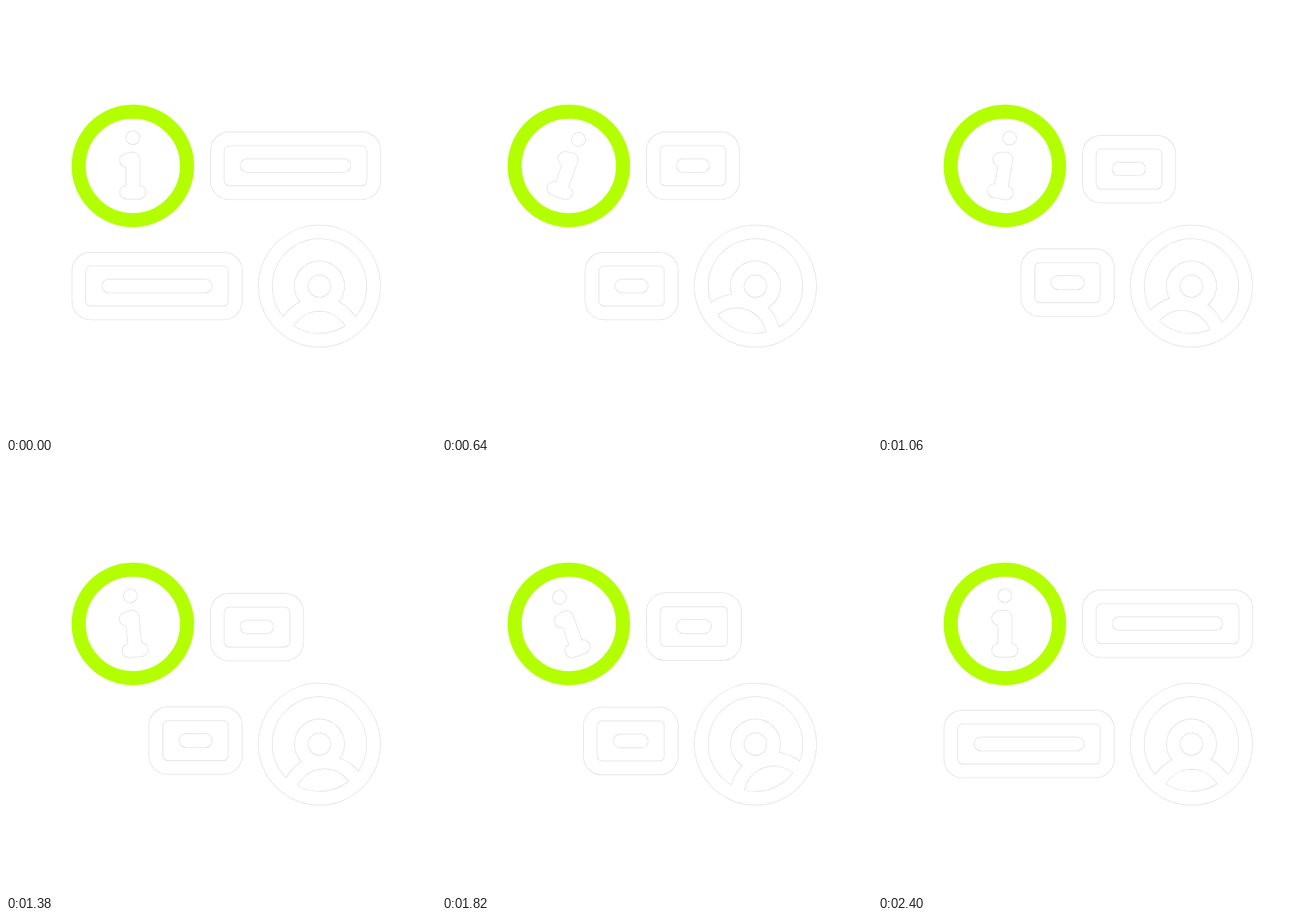
An HTML page for the animation above (2.42 s loop, 640 by 640 pixels).

```html
<!DOCTYPE html>
<html lang="en">
<head>
<meta charset="utf-8">
<title>Info chat icon</title>
<style>
  html, body { margin: 0; width: 100%; height: 100%; overflow: hidden; background: #fff; }
  svg { display: block; width: 100vw; height: 100vh; }
  .edge { stroke: #c6c6c6; stroke-width: 21.1; }
  .face { stroke: #fff; stroke-width: 20.1; }
</style>
</head>
<body>
<svg viewBox="0 0 640 640" fill="none" stroke-linecap="round" stroke-linejoin="round">
  <defs>
    <clipPath id="disc"><circle cx="466.5" cy="416.9" r="82"/></clipPath>
    <g id="shapes">
      <g id="letter">
        <path d="M188.8 196h.01M179.5 229.7L188.8 227.9V277.2M179.6 277.2H197.8"/>
      </g>
      <g id="right">
        <rect id="rightBox" x="314.6" y="197.7" height="80" rx="17.5"/>
        <path id="rightLine"/>
      </g>
      <g id="left">
        <rect id="leftBox" y="376.7" height="80" rx="17.5"/>
        <path id="leftLine"/>
      </g>
      <circle cx="466.5" cy="416.9" r="80.6"/>
      <circle cx="466.5" cy="416.9" r="27"/>
      <g clip-path="url(#disc)">
        <circle id="body" cx="466.5" cy="498.2" r="54.3"/>
      </g>
    </g>
  </defs>
  <use href="#shapes" class="edge"/>
  <use href="#shapes" class="face"/>
  <circle cx="188.8" cy="238" r="80.7" stroke="#b3ff00" stroke-width="21"/>
</svg>
<script>
  const LOOP = 2420;

  // [time in ms, value], eased in and out between neighbours
  const TILT = [[0, 0], [625, 20], [1920, -20], [2400, 0]];
  const SHRINK = [[0, 0], [630, 114.8], [1760, 114.8], [2400, 0]];
  const DRIFT = [[0, 0], [640, 0], [1040, 5], [1650, 5], [2400, 0]];

  const $ = id => document.getElementById(id);
  const set = (id, attrs) => {
    for (const key in attrs) $(id).setAttribute(key, attrs[key]);
  };

  function valueAt(track, t) {
    for (let i = 1; i < track.length; i++) {
      const [t0, a] = track[i - 1], [t1, b] = track[i];
      if (t <= t1) return a + (b - a) * (1 - Math.cos(Math.PI * (t - t0) / (t1 - t0))) / 2;
    }
    return track[track.length - 1][1];
  }

  function draw(t) {
    const tilt = valueAt(TILT, t);
    const shrink = valueAt(SHRINK, t);
    const drift = valueAt(DRIFT, t);
    const width = 232.8 - shrink;

    set('letter', { transform: `rotate(${tilt} 188.8 238)` });
    set('body', { transform: `rotate(${tilt} 466.5 416.9)` });

    set('right', { transform: `translate(0 ${drift})` });
    set('rightBox', { width });
    set('rightLine', { d: `M359 237.5H${502.7 - shrink}` });

    set('left', { transform: `translate(0 ${-drift})` });
    set('leftBox', { x: 108.4 + shrink, width });
    set('leftLine', { d: `M${153.2 + shrink} 416.7H296.6` });
  }

  const start = performance.now();
  function tick() {
    draw((performance.now() - start) % LOOP);
    requestAnimationFrame(tick);
  }
  tick();
</script>
</body>
</html>
```
